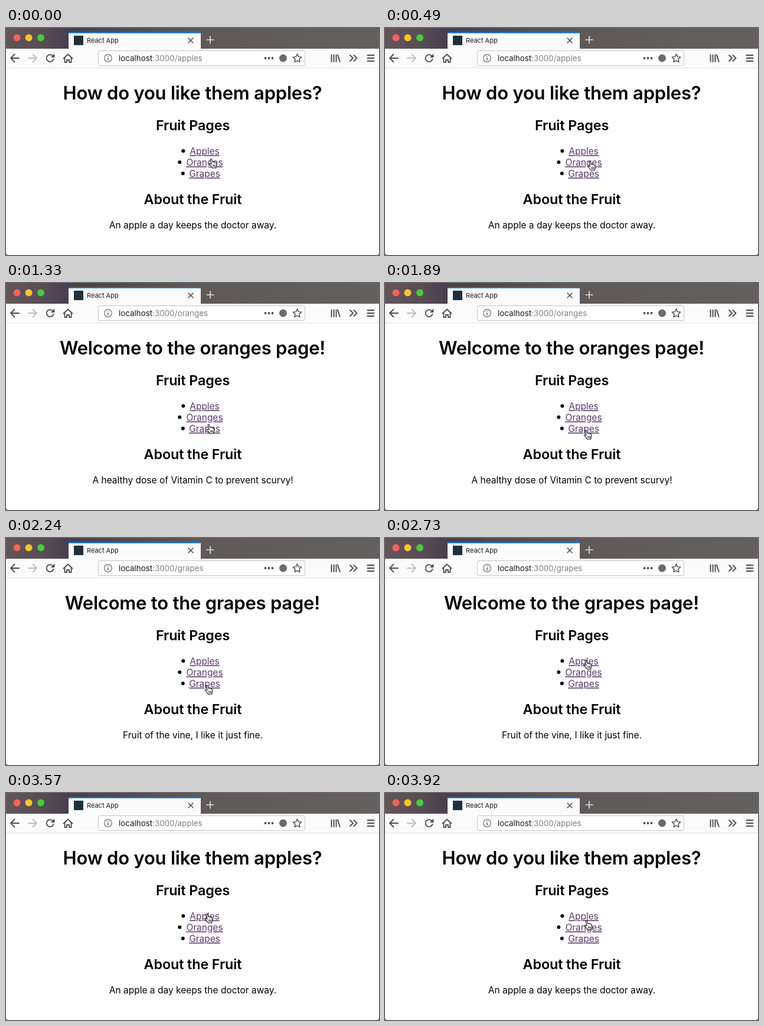
Animation, 632 px wide and 384 px high, one loop 3.99 s. Source, as an HTML page:

```html
<!DOCTYPE html>
<html lang="en">
<head>
<meta charset="utf-8">
<title>Fruit pages</title>
<style>
  html, body { margin: 0; width: 100%; height: 100%; overflow: hidden; background: #55504f; }
  svg { display: block; width: 632px; height: 384px; font-family: Inter, "Open Sans", sans-serif; font-optical-sizing: none; }
  .icon { fill: none; stroke: #4a4a4d; stroke-width: 1.8; stroke-linecap: round; stroke-linejoin: round; }
  .heading { font-weight: 600; text-anchor: middle; }
  .h1 { font-size: 31px; letter-spacing: -.007em; }
  .h2 { font-size: 23.3px; letter-spacing: -.004em; }
  .copy { font-size: 15.5px; letter-spacing: -.03px; word-spacing: .15px; text-anchor: middle; }
  .link { text-decoration: underline 1px; text-underline-offset: 2px; text-decoration-skip-ink: none; }
  .url { font-size: 13.4px; fill: #808083; }
</style>
</head>
<body>
<svg viewBox="0 0 632 384">
  <defs>
    <linearGradient id="bar">
      <stop offset="0" stop-color="#62565a"/>
      <stop offset=".1" stop-color="#584c54"/>
      <stop offset=".168" stop-color="#473e50"/>
      <stop offset=".52" stop-color="#5f5959"/>
      <stop offset="1" stop-color="#656060"/>
    </linearGradient>
  </defs>

  <path d="M0 34H632V380Q632 384 628 384H4Q0 384 0 380Z" fill="#fff"/>
  <rect width="632" height="36" fill="url(#bar)"/>
  <circle cx="18.5" cy="16.5" r="6" fill="#f5625a"/>
  <circle cx="38.5" cy="16.5" r="6" fill="#fac32c"/>
  <circle cx="59" cy="16.5" r="6" fill="#49ca3c"/>

  <rect y="35" width="632" height="32" fill="#fbfbfc"/>
  <rect y="67" width="632" height="1" fill="#e2e2e4"/>
  <rect x="106" y="7" width="224" height="29" fill="#fbfbfc"/>
  <rect x="106" y="7" width="224" height="2" fill="#1f7fd0"/>
  <rect x="115" y="13" width="16" height="16" fill="#20303a"/>
  <text x="137" y="25" font-size="11" fill="#19191b">React App</text>
  <path d="M309 17l8 8m0-8l-8 8" stroke="#4a4a4d" stroke-width="1.5" stroke-linecap="round"/>
  <path d="M346 13.5v13M339.5 20h13" stroke="#e2dfdf" stroke-width="1.7"/>

  <rect x="156.5" y="38.5" width="350" height="25" rx="2.5" fill="#fff" stroke="#c4c4c6"/>
  <g class="icon">
    <path d="M22 51H8m6.500-6.500L8 51l6.500 6.500"/>
    <path d="M38 51h14m-6.500-6.500L52 51l-6.500 6.500" stroke="#bdbdc0"/>
    <path d="M79.500 47.500a6 6 0 1 0 1 5"/>
    <path d="M82 44.500v5h-5z" fill="#4a4a4d" stroke-width=".8"/>
    <path d="M97.500 51.500L105 44.500l7.500 7M99.500 51v7h3.500v-4h4v4h3.500v-7"/>
    <g stroke="#6b6b6e" stroke-width="1.2">
      <circle cx="173" cy="51" r="6.3"/>
      <path d="M173 50.500v3.700M173 47.800v.1" stroke-width="1.6"/>
    </g>
    <path id="star" stroke-width="1.4"/>
    <path d="M551.500 45.500v11.500M555.500 45.500v11.500M559.500 45.500v11.500M562 45.500l3.700 11.500" stroke-width="1.9"/>
    <path d="M583 46l5 5-5 5m6.500-10l5 5-5 5"/>
    <path d="M612.500 46h11m-11 5h11m-11 5h11"/>
  </g>
  <g fill="#4a4a4d">
    <circle cx="439.5" cy="51" r="1.9"/>
    <circle cx="445.5" cy="51" r="1.9"/>
    <circle cx="451.5" cy="51" r="1.9"/>
    <circle cx="469.5" cy="51" r="6.5" fill="#6b6b6e"/>
  </g>
  <text class="url" x="191" y="56"><tspan fill="#19191b">localhost</tspan>:3000/<tspan id="path"></tspan></text>

  <text id="title" class="heading h1" x="316" y="120.5"></text>
  <text class="heading h2" x="316.5" y="172.5">Fruit Pages</text>
  <g>
    <circle cx="300.3" cy="208" r="3"/>
    <circle cx="294.3" cy="227" r="3"/>
    <circle cx="299.8" cy="246" r="3"/>
  </g>
  <g id="links">
    <text class="copy link" x="336.5" y="214">Apples</text>
    <text class="copy link" x="336.5" y="233">Oranges</text>
    <text class="copy link" x="336.5" y="252">Grapes</text>
  </g>
  <text class="heading h2" x="316.5" y="298">About the Fruit</text>
  <text id="fact" class="copy" x="316.5" y="339"></text>

  <g id="hand" stroke="#161616" stroke-linejoin="round" stroke-linecap="round">
    <path fill="#fff" stroke-width="1.1" d="M5 10.400L3.200 2.900C2.800 1 5 .6 5.500 2.300L6.900 6.800C7.500 5.800 8.700 5.800 9 6.900 9.800 6.200 10.900 6.300 11.200 7.400 12.200 7 13.200 7.600 13.300 8.600L13.700 12C13.700 14 12.700 15 12.700 16.800H6.700C6 15 3.500 13 2 11 .6 9.400 2.200 8.400 3.400 9.400Z"/>
    <path fill="none" stroke-width=".9" d="M7.600 11.500l.3 3M9.500 11.500l.2 3M11.400 11.500v3"/>
  </g>
</svg>
<script>
  const LOOP = 3990, STEP = 70;
  const $ = id => document.getElementById(id);

  const pages = {
    apples: ["How do you like them apples?", "An apple a day keeps the doctor away."],
    oranges: ["Welcome to the oranges page!", "A healthy dose of Vitamin C to prevent scurvy!"],
    grapes: ["Welcome to the grapes page!", "Fruit of the vine, I like it just fine."]
  };

  // time, x, y of the pointer
  const route = [
    [0, 343, 220], [350, 342.5, 224], [980, 342.5, 224], [1330, 339, 238],
    [1540, 336, 247.5], [2310, 336, 247.5], [2800, 336, 203],
    [3430, 336, 202.5], [3570, 336, 203], [3920, 337, 214.5], [3990, 343, 220]
  ];

  const smooth = k => k * k * (3 - 2 * k);

  function pointerAt(t) {
    const i = route.findIndex(point => point[0] > t);
    const [t0, x0, y0] = route[i - 1], [t1, x1, y1] = route[i];
    const k = smooth((t - t0) / (t1 - t0));
    return [x0 + (x1 - x0) * k, y0 + (y1 - y0) * k];
  }

  function pageAt(t) {
    if (t < 630 || t >= 3500) return "apples";
    return t < 2100 ? "oranges" : "grapes";
  }

  function starPath(cx, cy, outer, inner) {
    const corners = Array.from({ length: 10 }, (_, i) => {
      const r = i % 2 ? inner : outer, a = i * Math.PI / 5;
      return [cx + r * Math.sin(a), cy - r * Math.cos(a)];
    });
    return `M${corners.join("L")}Z`;
  }

  function draw(now) {
    const t = Math.floor(now % LOOP / STEP) * STEP;
    const page = pageAt(t), [title, fact] = pages[page];
    $("path").textContent = page;
    $("title").textContent = title;
    $("fact").textContent = fact;
    $("links").setAttribute("fill", t >= 630 && t < 980 ? "#43309a" : "#59396c");
    $("hand").setAttribute("transform", `translate(${pointerAt(t)})`);
  }

  $("star").setAttribute("d", starPath(493.5, 51.5, 7.6, 3.6));
  const start = performance.now();
  function tick() {
    draw(performance.now() - start);
    requestAnimationFrame(tick);
  }
  tick();
</script>
</body>
</html>
```
